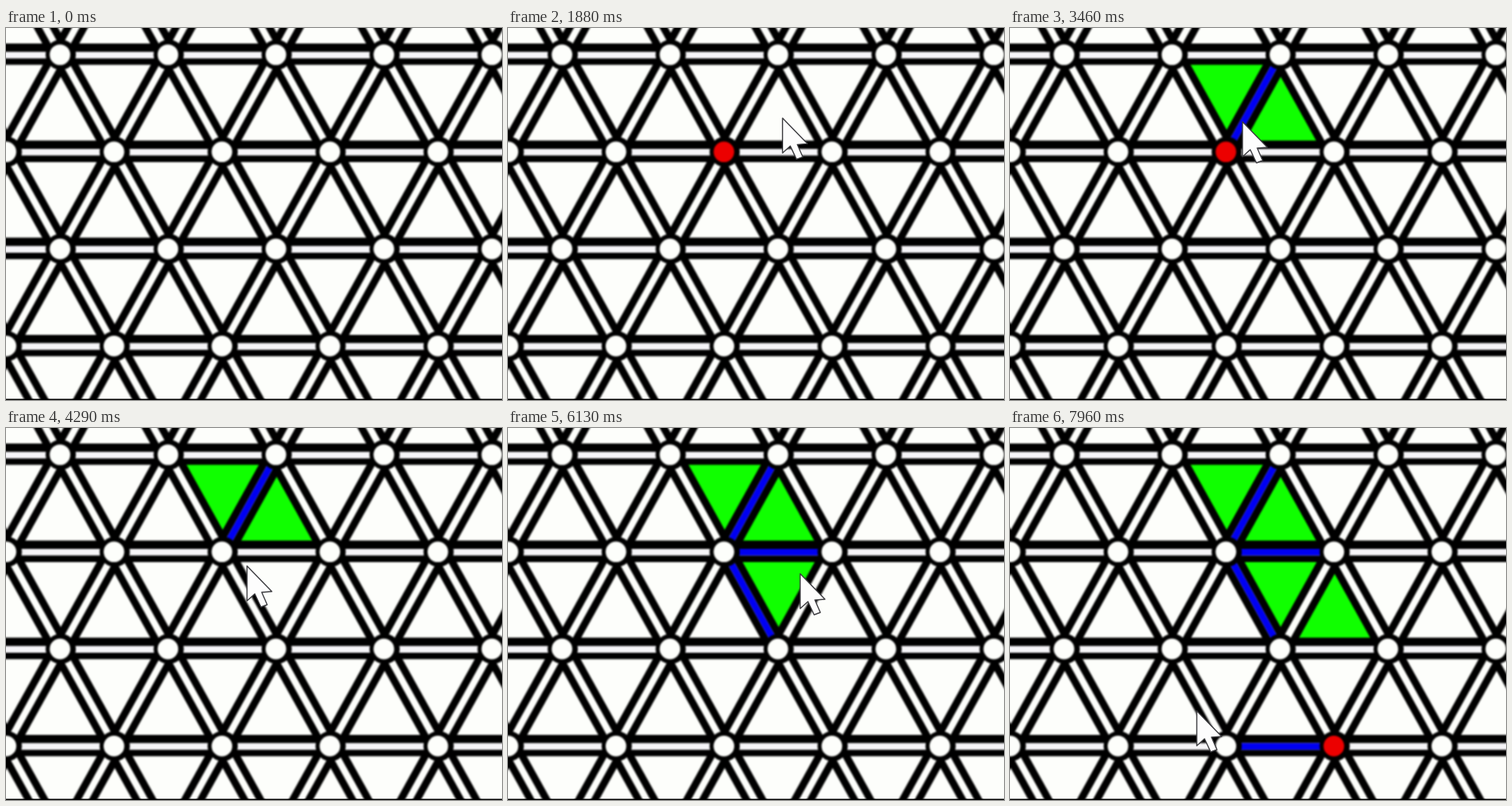
Animation, 640 px wide and 480 px high, one loop 8 s. Source, as an HTML page with a canvas:

```html
<!DOCTYPE html>
<html lang="en">
<head>
<meta charset="utf-8">
<title>Triangle grid editor</title>
<style>
  html, body { margin: 0; width: 100%; height: 100%; overflow: hidden; background: #fdfefb; }
  canvas { display: block; }
</style>
</head>
<body>
<canvas id="stage" width="640" height="480"></canvas>
<script>
const LOOP = 8000, W = 640, H = 480, PAD = 10;
const CELL = 139.3, ROW_H = 125.3, ROWS = 6, COLS = 7;
const PAPER = '#fdfefb', GREEN = '#10ff00', BLUE = '#0000f2', RED = '#ec0000';

const stage = document.getElementById('stage').getContext('2d');

function layer() {
  const c = document.createElement('canvas');
  c.width = W + 2 * PAD;
  c.height = H + 2 * PAD;
  const g = c.getContext('2d');
  g.translate(PAD, PAD);
  return g;
}
const sharp = layer(), scene = layer();

// Odd rows are shifted by half a cell.
const node = (row, col) => ({
  x: (col + (row % 2) / 2) * CELL,
  y: 34.5 + (row - 1) * ROW_H
});

const N = {
  topLeft: node(1, 1), topRight: node(1, 2),
  hub: node(2, 2), east: node(2, 3),
  south: node(3, 2), southEast: node(3, 3),
  lowLeft: node(4, 2), lowRight: node(4, 3)
};

// Each click toggles a dot, an edge or a triangle, by its corner count.
const click = (t, ...at) => ({ t, at });
const clicks = [
  click(1080, N.hub),
  click(1930, N.topRight, N.hub, N.east),
  click(2300, N.topLeft, N.topRight, N.hub),
  click(2900, N.topRight, N.hub),
  click(3740, N.hub),
  click(4640, N.hub, N.south),
  click(5100, N.hub, N.east, N.south),
  click(5640, N.hub, N.east),
  click(6420, N.east, N.south, N.southEast),
  click(6920, N.lowRight),
  click(7440, N.lowLeft, N.lowRight)
];

const mean = (pts, axis) => pts.reduce((sum, p) => sum + p[axis], 0) / pts.length;
const stop = (t, x, y) => ({ t, x, y });

// The pointer visits every click and a few turning points.
const path = [
  stop(170, 28, 130), stop(960, 289, 146), stop(1170, 291, 158),
  stop(1790, 362, 112), stop(2630, 308, 79), stop(3460, 300, 121),
  stop(4290, 311, 178), stop(6130, 377, 188), stop(6640, 475, 290),
  stop(6830, 433, 356), stop(7000, 414, 383), stop(7670, 318, 425),
  stop(7960, 241, 365),
  ...clicks.map(({ t, at }) => stop(t, mean(at, 'x') + 3, mean(at, 'y')))
].sort((a, b) => a.t - b.t);

function line(g, [a, b], width, color, shift) {
  g.strokeStyle = color;
  g.lineWidth = width;
  g.beginPath();
  g.moveTo(a.x + shift.x, a.y + shift.y);
  g.lineTo(b.x + shift.x, b.y + shift.y);
  g.stroke();
}
const isFlat = ([a, b]) => a.y === b.y;
const wall = (g, e) => line(g, e, 27.6, '#000', isFlat(e) ? { x: 0, y: -0.7 } : { x: 1, y: 0 });
const core = (g, e, color) => line(g, e, 8.6, color, isFlat(e) ? { x: 0, y: 0.5 } : { x: 1, y: 0 });

function disc(g, x, y, r, color) {
  g.fillStyle = color;
  g.beginPath();
  g.arc(x, y, r, 0, 2 * Math.PI);
  g.fill();
}

function dot(g, p, color) {
  disc(g, p.x + 1, p.y, 19.5, '#000');
  disc(g, p.x, p.y, 13.3, color);
}

const nodes = [], edges = [];
for (let r = 0; r < ROWS; r++)
  for (let c = -1; c < COLS; c++) {
    const p = node(r, c), odd = r % 2;
    nodes.push(p);
    edges.push([p, node(r, c + 1)], [p, node(r + 1, c + odd)], [p, node(r + 1, c + odd - 1)]);
  }

function render(done) {
  const g = sharp;
  const marks = size => done.filter(c => c.at.length === size).map(c => c.at);
  g.fillStyle = PAPER;
  g.fillRect(-PAD, -PAD, W + 2 * PAD, H + 2 * PAD);
  g.fillStyle = GREEN;
  for (const corners of marks(3)) {
    g.beginPath();
    corners.forEach(p => g.lineTo(p.x, p.y));
    g.fill();
  }
  edges.forEach(e => wall(g, e));
  edges.forEach(e => core(g, e, isFlat(e) ? '#f6f5f8' : PAPER));
  marks(2).forEach(e => core(g, e, BLUE));
  const picked = marks(1).map(([p]) => p);
  for (const p of nodes) {
    const hits = picked.filter(q => q.x === p.x && q.y === p.y).length;
    dot(g, p, hits % 2 ? RED : PAPER);
  }
  scene.filter = 'blur(0.9px)';
  scene.drawImage(g.canvas, -PAD, -PAD);
}

function pointerAt(t) {
  const i = path.findIndex(k => k.t > t);
  if (i === 0) return null;
  if (i < 0) return path[path.length - 1];
  const a = path[i - 1], b = path[i];
  const u = (t - a.t) / (b.t - a.t), e = u * u * (3 - 2 * u);
  return { x: a.x + (b.x - a.x) * e, y: a.y + (b.y - a.y) * e };
}

const arrow = [[0, 0], [0, 45], [10, 36], [18, 53], [26, 50], [19, 34], [32, 33]];
function drawPointer({ x, y }) {
  stage.beginPath();
  arrow.forEach(([dx, dy]) => stage.lineTo(x + dx, y + dy));
  stage.closePath();
  stage.fillStyle = '#fdfdfd';
  stage.fill();
  stage.lineWidth = 1.4;
  stage.lineJoin = 'round';
  stage.strokeStyle = '#3a3a3e';
  stage.stroke();
}

let shown = -1;
function draw(now) {
  const t = now % LOOP;
  const done = clicks.filter(c => c.t <= t);
  if (done.length !== shown) {
    render(done);
    shown = done.length;
  }
  stage.drawImage(scene.canvas, -PAD, -PAD);
  stage.fillStyle = '#000';
  stage.fillRect(0, 478.5, W, 1.5);
  const tip = pointerAt(t);
  if (tip) drawPointer(tip);
}

const start = performance.now();
function tick() {
  draw(performance.now() - start);
  requestAnimationFrame(tick);
}
tick();
</script>
</body>
</html>
```
